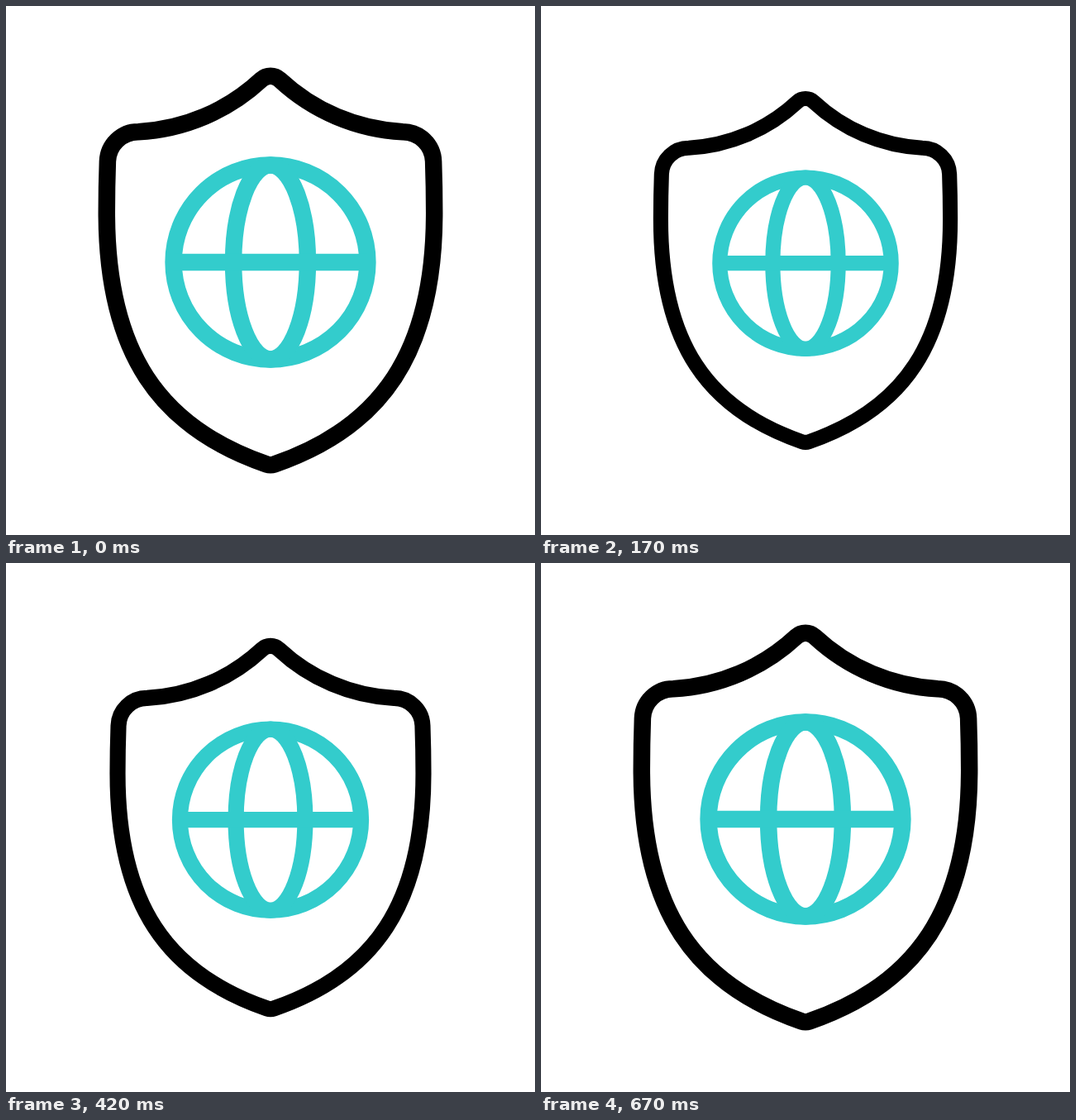
An HTML page for the animation above (1540 ms loop, 640 px wide and 640 px high).

```html
<!DOCTYPE html>
<html lang="en">
<head>
<meta charset="utf-8">
<title>Shield and globe</title>
<style>
  html, body { margin: 0; width: 100%; height: 100%; overflow: hidden; background: #fff; }
  svg { display: block; width: 100%; height: 100%; }
</style>
</head>
<body>
<svg viewBox="0 0 640 640">
  <g id="icon" fill="none" stroke-width="20.5">
    <path stroke="#000" d="M309 89
      A16.1 16.1 0 0 1 331 89
      A236.5 236.5 0 0 0 480 152.2
      A37 37 0 0 1 517.1 188
      Q518.2 219 518.2 250
      C518.2 420 454 510 324.6 554.5
      A14 14 0 0 1 315.4 554.5
      C186 510 121.8 420 121.8 250
      Q121.8 219 122.9 188
      A37 37 0 0 1 160 152.2
      A236.5 236.5 0 0 0 309 89Z"/>
    <g stroke="#33cccc">
      <circle cx="320" cy="310" r="117.4"/>
      <ellipse cx="320" cy="310" rx="44.9" ry="117.4"/>
      <path d="M203 310H437"/>
    </g>
  </g>
</svg>
<script>
  const LOOP = 1540;
  const STEP = 1000 / 24;
  const icon = document.getElementById('icon');
  const began = performance.now();

  // Step starts fall on whole hundredths of a second.
  const stepStart = n => 10 * Math.round(n * STEP / 10);

  function stepAt(ms) {
    const next = Math.floor(ms / STEP) + 1;
    return stepStart(next) <= ms ? next : next - 1;
  }

  // Depth of a dip centred on mid: eases out going down, eases in coming back.
  function dip(step, mid, half, depth, power) {
    const u = (step - mid) / half;
    if (Math.abs(u) >= 1) return 0;
    return depth * (1 - Math.pow(Math.abs(u), u < 0 ? power : 2));
  }

  function draw(ms) {
    const step = stepAt(ms);
    const scale = 1 - dip(step, 6, 6, 0.12, 3.2) - dip(step, 14, 2, 0.05, 2);
    icon.setAttribute('transform', `translate(320 320) scale(${scale}) translate(-320 -320)`);
  }

  function tick() {
    draw((performance.now() - began) % LOOP);
    requestAnimationFrame(tick);
  }
  tick();
</script>
</body>
</html>
```
